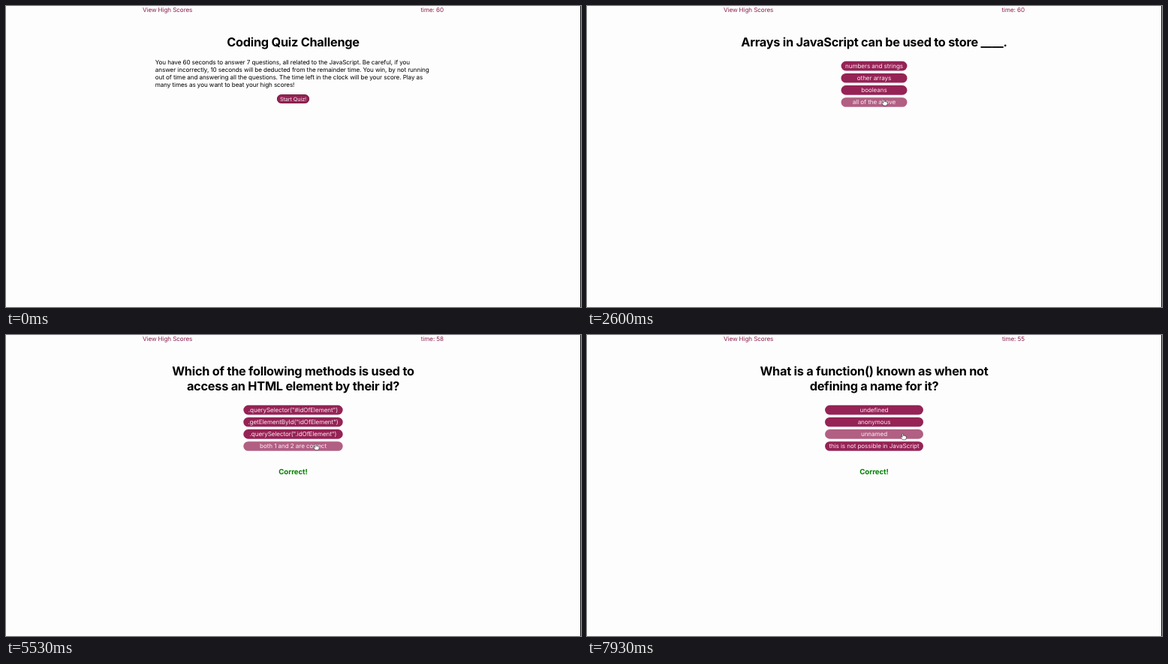
An HTML page for the animation above (8000 ms loop, 766 px wide and 402 px high).

```html
<!DOCTYPE html>
<html lang="en">
<head>
<meta charset="utf-8">
<title>Coding Quiz</title>
<style>
  html, body { margin: 0; width: 100%; height: 100%; overflow: hidden; background: #fdfdfd; }
  svg { display: block; width: 100%; height: 100%; }
  text { font: 8.1px Inter, "Open Sans", sans-serif; letter-spacing: -.08px; text-rendering: geometricPrecision; fill: #000; white-space: pre; }
  .bar { fill: #8c1f50; }
  .title { font-size: 16.3px; font-weight: 700; letter-spacing: -.24px; text-anchor: middle; }
  .label { fill: #f8e9f0; text-anchor: middle; }
  .small { font-size: 7.2px; letter-spacing: -.06px; }
  .result { font-size: 9.7px; font-weight: 700; letter-spacing: -.08px; fill: #008000; text-anchor: middle; }
  .button { fill: #952355; }
  .edge { fill: none; stroke: #6a1239; stroke-width: .8; }
  .hover { opacity: .72; }
</style>
</head>
<body>
<svg id="stage" viewBox="0 0 766 402">
  <rect width="766" height="402" fill="#fdfdfd"/>
  <rect x="765" width="1" height="402" fill="#111"/>
  <text class="bar" x="182" y="8.1">View High Scores</text>
  <text class="bar" id="clock" x="583" y="8.1" text-anchor="end">time: 60</text>
  <g id="scenes"></g>
  <text class="result" id="result" x="382.5" y="185.8">Correct!</text>
  <g id="cursor">
    <path id="arrow" d="M0 0V6.7L1.6 5.3 2.6 7.7 3.7 7.2 2.7 4.9H4.8Z" fill="#000" stroke="#fff" stroke-width=".9" paint-order="stroke"/>
    <path id="hand" d="M-.8 .7Q0 -.3 .8 .7V3.2Q1.7 2.6 2.2 3.4 3 2.9 3.5 3.7 4.7 3.3 4.7 4.7V6.2L3.8 8.6H-.4L-2.6 5.6Q-3.3 4.5-2.2 4.2L-.8 5.2Z" fill="#fff" stroke="#222" stroke-width=".6" stroke-linejoin="round"/>
  </g>
</svg>
<script>
const LOOP = 8000, STEP = 200 / 3, CENTER = 382.5;
const $ = id => document.getElementById(id);

const questions = [
  { at: 2600, width: 88, title: ["Arrays in JavaScript can be used to store ____."],
    answers: ["numbers and strings", "other arrays", "booleans", "all of the above"] },
  { at: 4730, width: 132.4, title: ["Which of the following methods is used to", "access an HTML element by their id?"],
    answers: ['.querySelector("#idOfElement")', '.getElementById("idOfElement")', '.querySelector(".idOfElement")', "both 1 and 2 are correct"] },
  { at: 6060, width: 75, title: ["Which of the following methods can be used to", "display data in some form using JavaScript?"],
    answers: ["document.write()", "console.log()", "window.alert()", "all of the above"] },
  { at: 7130, width: 131, title: ["What is a function() known as when not", "defining a name for it?"],
    answers: ["undefined", "anonymous", "unnamed", "this is not possible in JavaScript"] }
];

const intro = [
  "You have 60 seconds to answer 7 questions, all related to the JavaScript. Be careful, if you",
  "answer incorrectly, 10 seconds will be deducted from the remainder time. You win, by not running",
  "out of time and answering all the questions. The time left in the clock will be your score. Play as",
  "many times as you want to beat your high scores!"
];

// Pointer tip: time, x, y
const path = [
  [1000, 455, 231], [1200, 450, 229], [1400, 446, 226], [1600, 426, 188], [1800, 401, 139],
  [1930, 398, 129], [2060, 396, 125], [2200, 395.5, 124.5], [2800, 395.5, 124.5],
  [3000, 408, 158], [3200, 418, 187], [3870, 418, 187], [4000, 416, 170], [4130, 414, 142],
  [4270, 416, 131], [4730, 418, 127], [5070, 418, 127], [5400, 414, 141], [5660, 411, 149],
  [6470, 411, 149], [6660, 413, 150], [6860, 411, 149], [7470, 411, 149], [7700, 416, 142], [7930, 420.7, 131.3]
];

function add(parent, tag, attrs, content = "") {
  const node = document.createElementNS("http://www.w3.org/2000/svg", tag);
  for (const key in attrs) node.setAttribute(key, attrs[key]);
  node.textContent = content;
  return parent.appendChild(node);
}

function addButton(scene, label, y, width, height, small) {
  const node = add(scene.node, "g", {});
  const box = { x: CENTER - width / 2, y, width, height, rx: height / 2 };
  add(node, "rect", { ...box, class: "button" });
  if (small) {
    const edge = { x: box.x + .4, y: y + .4, width: width - .8, height: height - .8, rx: height / 2 - .4 };
    scene.edge = add(node, "rect", { ...edge, class: "edge" });
  }
  add(node, "text", { x: CENTER, y: y + height / 2 + (small ? 2.6 : 2.9), class: small ? "label small" : "label" }, label);
  scene.buttons.push({ node, ...box });
}

function addScene(at, title) {
  const scene = { at, node: add($("scenes"), "g", {}), buttons: [] };
  title.forEach((line, i) => add(scene.node, "text", { x: CENTER, y: 54 + 20 * i, class: "title" }, line));
  return scene;
}

const start = addScene(0, ["Coding Quiz Challenge"]);
intro.forEach((line, i) => add(start.node, "text", { x: 198.8, y: 78.4 + 9.95 * i }, line));
addButton(start, "Start Quiz!", 118.2, 43, 11.8, true);

const scenes = [start, ...questions.map(q => {
  const scene = addScene(q.at, q.title);
  const top = 53.8 + 20 * q.title.length;
  q.answers.forEach((label, i) => addButton(scene, label, top + 16.15 * i, q.width, 12.6));
  return scene;
})];

function pointer(t) {
  const i = path.findIndex(p => p[0] > t);
  if (i < 0) return path[path.length - 1].slice(1);
  if (i === 0) return path[0].slice(1);
  const [t0, x0, y0] = path[i - 1], [t1, x1, y1] = path[i];
  const k = (t - t0) / (t1 - t0);
  return [x0 + (x1 - x0) * k, y0 + (y1 - y0) * k];
}

const show = (node, on) => node.setAttribute("visibility", on ? "visible" : "hidden");

function draw(now) {
  const t = Math.floor((now % LOOP + 8) / STEP) * STEP;
  const current = scenes.filter(s => s.at <= t).pop();
  const [x, y] = pointer(t);
  const visible = t >= 1000;
  let over = false;

  for (const scene of scenes) scene.node.style.display = scene === current ? "" : "none";
  for (const b of current.buttons) {
    const hit = visible && x > b.x && x < b.x + b.width && y > b.y && y < b.y + b.height;
    b.node.setAttribute("class", hit ? "hover" : "");
    over = over || hit;
  }
  start.edge.style.strokeWidth = t >= 2460 ? 1.2 : .8;

  $("clock").textContent = "time: " + (60 - Math.max(0, Math.floor((t - 2600) / 1000)));
  show($("result"), (t >= 4730 && t < 5660) || (t >= 6060 && t < 6860) || t >= 7130);
  $("cursor").setAttribute("transform", `translate(${x} ${y})`);
  show($("arrow"), visible && !over);
  show($("hand"), visible && over);
}

function tick() {
  draw(performance.now());
  requestAnimationFrame(tick);
}
tick();
</script>
</body>
</html>
```
